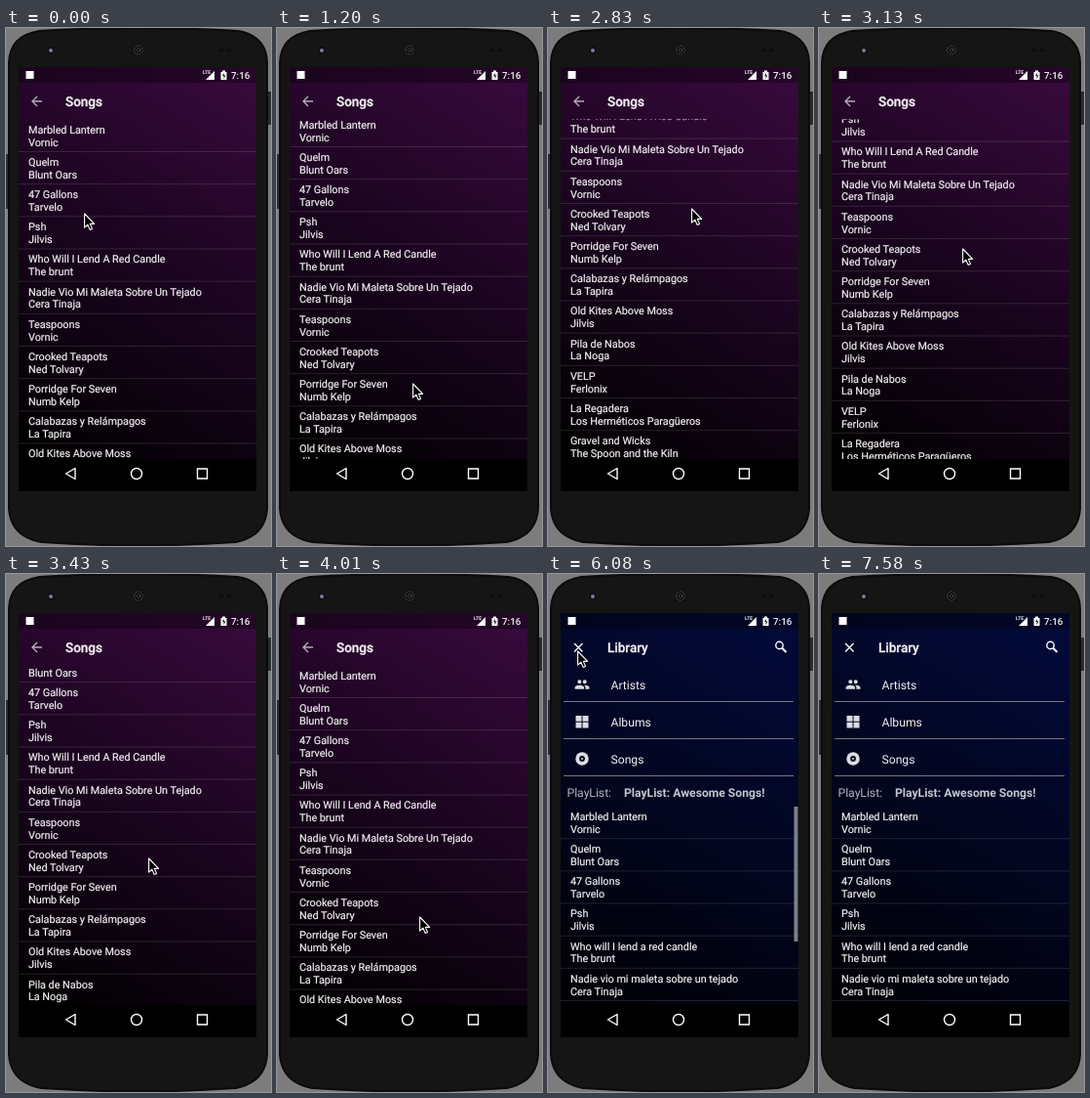
An HTML page for the animation above (7830 ms loop, 272 by 530 pixels).

```html
<!DOCTYPE html>
<html lang="en">
<head>
<meta charset="utf-8">
<title>Music library</title>
<style>
  html, body { margin: 0; width: 100%; height: 100%; overflow: hidden; background: #7c7c7c; }
  svg { display: block; width: 100vw; height: 100vh; }
  text { font-family: Roboto, sans-serif; fill: #f4f1f4; text-rendering: geometricPrecision; white-space: pre; }
  .song { font-size: 10.8px; stroke: #f4f1f4; stroke-width: .2px; }
  .title { font-size: 13.5px; font-weight: 500; stroke: #f4f1f4; stroke-width: .3px; }
  .menu { font-size: 12.15px; }
  .muted { fill: #b4b6bf; }
  .strong { font-weight: 700; fill: #c4c6cd; }
  .clock { font-size: 9.8px; font-weight: 500; }
  .line { fill: none; stroke: #fff; stroke-width: 1.4; }
  .icon { fill: #dcdde2; }
</style>
</head>
<body>
<svg viewBox="0 0 272 530" preserveAspectRatio="none">
  <defs>
    <linearGradient id="plum" gradientUnits="userSpaceOnUse" x1="257" y1="40" x2="13" y2="441">
      <stop offset="0" stop-color="#390a3e"/>
      <stop offset=".5" stop-color="#1a041e"/>
      <stop offset="1" stop-color="#000"/>
    </linearGradient>
    <linearGradient id="navy" gradientUnits="userSpaceOnUse" x1="257" y1="40" x2="13" y2="441">
      <stop offset="0" stop-color="#030a3c"/>
      <stop offset=".5" stop-color="#020620"/>
      <stop offset="1" stop-color="#000004"/>
    </linearGradient>
    <clipPath id="screen"><path d="M13 40h244v402H13z"/></clipPath>
    <clipPath id="list"><path d="M13 93.500h244V442H13z"/></clipPath>
    <g id="status">
      <path d="M13 40h244v16H13z" fill="#000" opacity=".35"/>
      <rect x="20.500" y="44" width="8" height="8" fill="#fff"/>
      <path d="M205 53l9-9v9z" fill="#fff"/>
      <text x="202" y="47" font-size="5" font-weight="700">LTE</text>
      <path d="M220.500 45h1.500v-1.500h3V45h1.500v8h-6z" fill="#fff"/>
      <path d="M224 46l-2 3h1.500v3l2-3.500H224z" fill="#222"/>
      <text class="clock" x="231" y="51.500">7:16</text>
    </g>
  </defs>

  <!-- Phone body -->
  <rect width="272" height="530" fill="#7c7c7c"/>
  <path d="M269 65h3v34h-3zM0 129h3v56H0z" fill="#2a2a2a"/>
  <path d="M3 35Q4 8 34 3Q136-3 238 3Q267 8 268 35V492Q266 520 236 526Q136 533 36 526Q5 520 3 492z" fill="#151515" stroke="#0b0b0b" stroke-width="2"/>
  <circle cx="46" cy="23" r="3.500" fill="#0d0d0d"/>
  <circle cx="46" cy="23" r="2" fill="#7a7b9c"/>
  <circle cx="136" cy="22.500" r="6" fill="#0e0e0e"/>
  <circle cx="136" cy="22.500" r="4.500" fill="none" stroke="#444" stroke-width="1.500" stroke-dasharray="1.400 1.100"/>
  <circle cx="136" cy="22.500" r="1.800" fill="none" stroke="#444" stroke-width="1.500" stroke-dasharray="1.200 1"/>
  <circle cx="221" cy="23" r="2" fill="#0d0d0d"/>
  <circle cx="229" cy="23" r="2" fill="#0d0d0d"/>

  <g clip-path="url(#screen)">
    <g id="library">
      <path d="M13 40h244v402H13z" fill="url(#navy)"/>
      <use href="#status"/>
      <path class="line" d="M27 71l8.500 8.500m0-8.500L27 79.500"/>
      <text class="title" x="61" y="80">Library</text>
      <circle class="line" cx="237.500" cy="73" r="3.700"/>
      <path class="line" d="M240.200 75.700l4.300 4.300" style="stroke-width:2"/>
      <path class="icon" transform="translate(26.900 104.900) scale(.675)" d="M16 11a3 3 0 1 0 0-6a3 3 0 0 0 0 6zM8 11a3 3 0 1 0 0-6a3 3 0 0 0 0 6zM8 13c-2.300 0-7 1.200-7 3.500V19h14v-2.500C15 14.200 10.300 13 8 13zM16 13l-1 .1c1.200.8 2 1.900 2 3.400V19h6v-2.500c0-2.300-4.700-3.500-7-3.500z"/>
      <path class="icon" d="M28.500 145h6v5.700h-6zm7 0h6v5.700h-6zm-7 6.700h6v5.700h-6zm7 0h6v5.700h-6z"/>
      <circle class="icon" cx="35" cy="189" r="6.750"/>
      <circle cx="35" cy="189" r="2.900" fill="#020620"/>
      <circle class="icon" cx="35" cy="189" r="1"/>
      <text class="menu" x="64.500" y="118">Artists</text>
      <text class="menu" x="64.500" y="156">Albums</text>
      <text class="menu" x="64.500" y="194">Songs</text>
      <path d="M16 130.500h236M16 168.500h236M16 206.500h236" stroke="#73757f"/>
      <text class="menu muted" x="19.500" y="228">PlayList:</text>
      <text class="menu strong" x="78" y="228">PlayList: Awesome Songs!</text>
      <g id="playlist" transform="translate(0 144.200)"></g>
      <rect id="bar" x="252.500" y="238" width="4" height="138" fill="#7d7f88"/>
    </g>
    <g id="songs">
      <path d="M13 40h244v402H13z" fill="url(#plum)"/>
      <use href="#status"/>
      <path class="line" d="M37 75H27m5-5l-5 5l5 5" style="stroke:#b5abb8"/>
      <text class="title" x="61" y="80">Songs</text>
      <g clip-path="url(#list)"><g id="tracks"></g></g>
    </g>
  </g>

  <path d="M13 441h244v33H13z" fill="#000"/>
  <path class="line" d="M71 450.500v11l-9.500-5.500z" stroke-linejoin="round"/>
  <circle class="line" cx="134" cy="456" r="5.500"/>
  <path class="line" d="M196.500 451h10v10h-10z"/>

  <path id="cursor" d="M.6 1v14.200l3.300-3l2.200 5.200l2.400-1l-2.200-5h4.300z" fill="#000" stroke="#fff" stroke-width="1.100" stroke-linejoin="round"/>
</svg>

<script>
const LOOP = 7830, TICK = 148.2, ROW = 33.17;
const $ = id => document.getElementById(id);

const songs = [
  ["Marbled Lantern", "Vornic"],
  ["Quelm", "Blunt Oars"],
  ["47 Gallons", "Tarvelo"],
  ["Psh", "Jilvis"],
  ["Who Will I Lend A Red Candle", "The brunt"],
  ["Nadie Vio Mi Maleta Sobre Un Tejado", "Cera Tinaja"],
  ["Teaspoons", "Vornic"],
  ["Crooked Teapots", "Ned Tolvary"],
  ["Porridge For Seven", "Numb Kelp"],
  ["Calabazas y Relámpagos", "La Tapira"],
  ["Old Kites Above Moss", "Jilvis"],
  ["Pila de Nabos", "La Noga"],
  ["VELP", "Ferlonix"],
  ["La Regadera", "Los Herméticos Paragüeros"],
  ["Gravel and Wicks", "The Spoon and the Kiln"]
];
const playlist = songs.slice(0, 4).concat([
  ["Who will I lend a red candle", "The brunt"],
  ["Nadie vio mi maleta sobre un tejado", "Cera Tinaja"]
]);

const rows = list => list.map(([name, artist], i) => `
  <g transform="translate(0 ${i * ROW})">
    <text class="song" x="23" y="107.700">${name}</text>
    <text class="song" x="23" y="120.600">${artist}</text>
    <path d="M13 126.500h244" stroke="#ffffff1e"/>
  </g>`).join("");
$("tracks").innerHTML = rows(songs);
$("playlist").innerHTML = rows(playlist);

// Each key: tick, then values
const pointer = [
  [2, 80, 189], [3, 92, 228], [4, 122, 330], [5, 138, 373], [7, 138, 373],
  [8, 139, 363], [10, 143, 290], [12, 148, 204], [14, 148, 176], [16, 148, 176],
  [18, 147, 179], [19, 147, 184], [21, 147, 225], [23, 146, 290], [24, 146, 325],
  [26, 146, 350], [29, 146, 350], [30, 138, 328], [31, 112, 262], [32, 72, 165],
  [33, 40, 98], [34, 30, 79], [35, 30, 79], [36, 30, 78], [43, 30, 78],
  [44, 31, 92], [46, 70, 230], [48, 120, 400], [50, 150, 535]
];
const scroll = [
  [7, 0], [8, 5], [10, 72], [12, 150], [17, 150], [19, 146],
  [21, 110], [23, 49], [24, 16], [25, 4], [26, 0]
];
const songsFade = [[39, 1], [41, 0]];
const barFade = [[48, 1], [51, 0]];

function at(keys, tick) {
  const next = keys.findIndex(key => key[0] > tick);
  if (next === 0) return keys[0].slice(1);
  if (next < 0) return keys[keys.length - 1].slice(1);
  const a = keys[next - 1], b = keys[next];
  const p = (tick - a[0]) / (b[0] - a[0]);
  return a.slice(1).map((v, i) => v + (b[i + 1] - v) * p);
}

function draw(now) {
  const tick = Math.floor(now % LOOP / TICK);
  const [x, y] = at(pointer, tick);
  const [fade] = at(songsFade, tick);
  $("cursor").setAttribute("transform", `translate(${Math.round(x)} ${Math.round(y)})`);
  $("tracks").setAttribute("transform", `translate(0 ${-at(scroll, tick)[0]})`);
  $("songs").setAttribute("opacity", fade);
  $("songs").setAttribute("transform", `translate(0 ${(1 - fade) * 10})`);
  $("bar").setAttribute("opacity", at(barFade, tick)[0]);
}

const start = performance.now();
function loop() {
  draw(performance.now() - start);
  requestAnimationFrame(loop);
}
loop();
</script>
</body>
</html>
```
